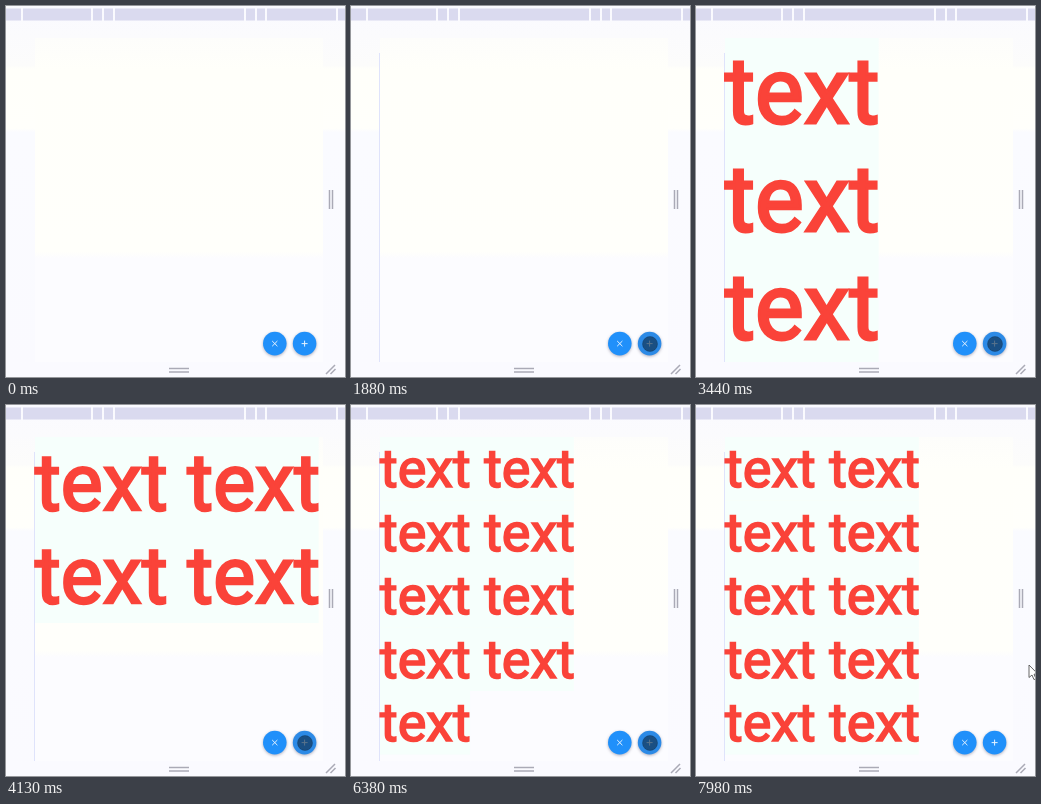
Recreate the animation shown at these times as an HTML page. Size 339 px wide and 371 px high, loop 8000 ms.

```html
<!DOCTYPE html>
<html lang="en">
<head>
<meta charset="utf-8">
<title>Fitting text</title>
<style>
  html, body { margin: 0; width: 100%; height: 100%; overflow: hidden; background: #fafbff; }
  svg { display: block; width: 339px; height: 371px; }
  #words { font-family: Roboto, sans-serif; font-weight: 400; }
  #words text { fill: #fa4339; stroke: #fa4339; stroke-width: .03em; stroke-linejoin: miter; }
  .button { filter: drop-shadow(0 1px 1.5px rgba(0, 0, 40, .3)); }
</style>
</head>
<body>
<svg viewBox="0 0 339 371">
  <defs>
    <linearGradient id="page" x2="0" y2="1">
      <stop offset="0" stop-color="#fafaff"/>
      <stop offset=".16" stop-color="#fcfcfb"/>
      <stop offset=".17" stop-color="#fffffa"/>
      <stop offset=".33" stop-color="#fffffb"/>
      <stop offset=".34" stop-color="#fafbff"/>
      <stop offset="1" stop-color="#fafaff"/>
    </linearGradient>
    <linearGradient id="card" x2="0" y2="1">
      <stop offset="0" stop-color="#fdfdfb"/>
      <stop offset=".1" stop-color="#fffffa"/>
      <stop offset=".66" stop-color="#fffffb"/>
      <stop offset=".68" stop-color="#fcfcff"/>
    </linearGradient>
  </defs>

  <rect width="339" height="371" fill="url(#page)"/>
  <g id="ruler" fill="#dadaef"></g>
  <rect x="29" y="32" width="288" height="324" fill="url(#card)"/>
  <path id="edge" d="M28.5 47V356" stroke="#dfe3fb"/>

  <g id="words"></g>

  <g stroke="#aaaab6" stroke-width="1.5" fill="none">
    <path d="M323.5 184V203M326.5 184V203M163 362.5H183M163 366H183"/>
    <path d="M320 368L329 359M324.5 368L329.5 363"/>
  </g>

  <g class="button">
    <circle cx="268.8" cy="337.6" r="11.8" fill="#2090fa"/>
    <path d="M266.2 335L271.4 340.2M271.4 335L266.2 340.2" stroke="#e4f2ff"/>
  </g>
  <g class="button">
    <circle id="add" cx="298.6" cy="337.6" r="11.8"/>
    <path d="M295.6 337.6H301.6M298.6 334.6V340.6" stroke="#e4f2ff"/>
  </g>

  <circle id="touch" r="7.5" fill="#10304f" fill-opacity=".66" stroke="#10304f" stroke-opacity=".35"/>
  <path id="arrow" d="M0 0V12.5L3 10L5 14.6L7 13.7L5 9.2H9Z" fill="#fff" stroke="#555" stroke-width=".9"/>
</svg>
<script>
const LOOP = 8000;
const LEFT = 29, TOP = 32;
const FIRST_CLICK = 2200, CLICK_GAP = 500, MAX_WORDS = 10;

// Largest word count for each layout: [words, font size, columns, line height]
const LAYOUTS = [
  [1, 171, 1, 200],
  [2, 138, 1, 162],
  [3, 92, 1, 108],
  [6, 79, 2, 93],
  [8, 69, 2, 81],
  [10, 54, 2, 63.5]
];

// Pointer path: [time, x, y]
const PATH = [
  [900, 338, 262],
  [1100, 327, 285],
  [1600, 299, 338],
  [7250, 299, 338],
  [7700, 327, 280],
  [7850, 333, 260]
];

const $ = id => document.getElementById(id);

function make(parent, name, attrs, content = "") {
  const node = document.createElementNS("http://www.w3.org/2000/svg", name);
  for (const key in attrs) node.setAttribute(key, attrs[key]);
  node.textContent = content;
  parent.append(node);
  return node;
}

const gaps = [0, 16, 86, 97, 108, 239, 250, 260, 331, 340];
gaps.slice(1).forEach((end, i) => {
  const x = i ? gaps[i] + 1 : 0;
  make($("ruler"), "rect", { x, y: 2.5, width: end - 1 - x, height: 12 });
});

let shown = -1;
function showWords(count) {
  if (count === shown) return;
  shown = count;
  const group = $("words");
  group.replaceChildren();
  if (!count) return;
  const [, size, columns, lineHeight] = LAYOUTS.find(layout => count <= layout[0]);
  for (let row = 0; row * columns < count; row++) {
    const inRow = Math.min(columns, count - row * columns);
    const y = TOP + row * lineHeight;
    make(group, "rect", {
      x: LEFT, y, width: size * (1.92 * inRow - .25), height: lineHeight, fill: "#f6fffc"
    });
    make(group, "text", { x: LEFT, y: y + size * .928, "font-size": size },
      Array(inRow).fill("text").join(" "));
  }
}

function pointerAt(time) {
  const next = PATH.findIndex(step => step[0] > time);
  if (next === 0) return null;
  if (next < 0) return PATH.at(-1).slice(1);
  const [t0, x0, y0] = PATH[next - 1], [t1, x1, y1] = PATH[next];
  const p = (time - t0) / (t1 - t0);
  const eased = p * p * (3 - 2 * p);
  return [x0 + (x1 - x0) * eased, y0 + (y1 - y0) * eased];
}

function showPointer(time) {
  const point = pointerAt(time);
  const outside = point && point[0] > 320;
  $("touch").style.display = point && !outside ? "" : "none";
  $("arrow").style.display = outside ? "" : "none";
  const over = point && Math.hypot(point[0] - 298.6, point[1] - 337.6) < 12;
  $("add").setAttribute("fill", over ? "#2c8ae6" : "#2090fa");
  if (point) {
    $(outside ? "arrow" : "touch").setAttribute("transform", `translate(${point})`);
  }
}

function draw() {
  const time = performance.now() % LOOP;
  const clicks = Math.floor((time - FIRST_CLICK) / CLICK_GAP) + 1;
  showWords(Math.max(0, Math.min(MAX_WORDS, clicks)));
  showPointer(time);
  $("edge").style.opacity = time < 900 ? 0 : 1;
  requestAnimationFrame(draw);
}
draw();
</script>
</body>
</html>
```
